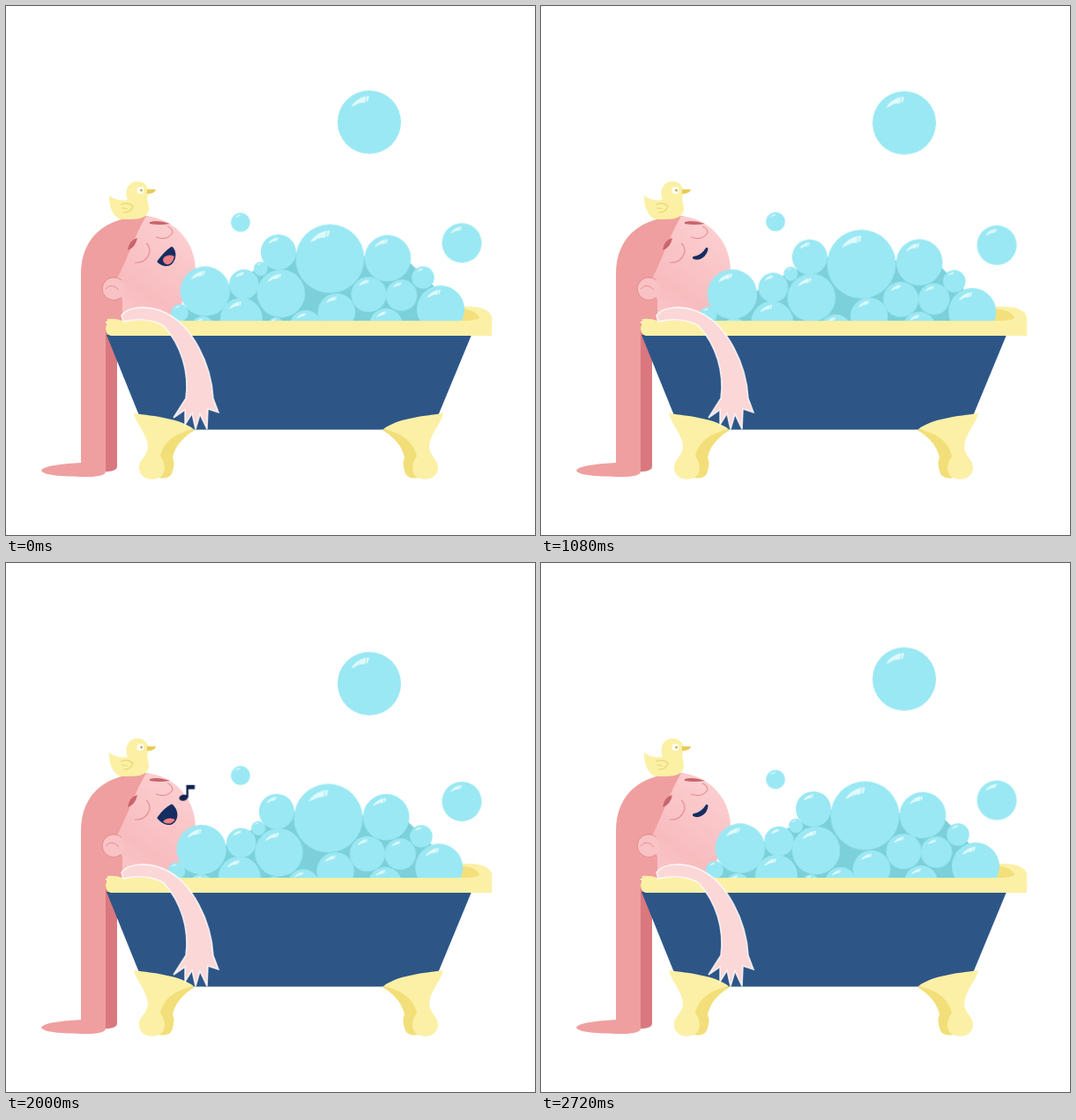
Animation, 600 px wide and 600 px high, one loop 2.76 s. Source, as an HTML page without scripts:

```html
<!DOCTYPE html>
<html lang="en">
<head>
<meta charset="utf-8">
<title>Bubble bath</title>
<style>
  html, body { margin: 0; width: 100%; height: 100%; overflow: hidden; background: #fff; }
  svg { display: block; width: 100vw; height: 100vh; }

  /* Foam leans left and sinks, each bubble by its own --x and --y */
  .foam > * { animation: lean 1380ms cubic-bezier(.37, 0, .63, 1) -105ms infinite alternate; }
  @keyframes lean { to { transform: translate(var(--x), var(--y)); } }

  .float { animation: bob 690ms cubic-bezier(.37, 0, .63, 1) var(--delay, -90ms) infinite alternate; }
  @keyframes bob { to { transform: translateY(var(--y)); } }

  .mouth { animation: sing 2760ms linear infinite; }
  @keyframes sing {
    0%, 100% { d: path("M173 290Q181 279 188 274.5C196 284 186 301 173 290Z"); }
    1.5%, 31.9%, 47.8%, 81.2% { d: path("M173 289Q180 279 188 275C200 286 188 306 173 289Z"); }
    34.8%, 44.9%, 84.8%, 98.5% { d: path("M173.5 285.5Q183 284 188 275.5C186.500 283 180 288 173.5 285.5Z"); }
  }
  .tongue { animation: tongue 2760ms linear infinite; transform-origin: 186px 295px; }
  @keyframes tongue {
    0%, 100% { transform: translateY(-7px); }
    1.5%, 31.9%, 47.8%, 81.2% { transform: none; }
    34.8%, 44.9%, 84.8%, 98.5% { transform: translateY(-8px) scale(0); }
  }

  .note { animation: rise 2760ms linear var(--delay) infinite; }
  @keyframes rise {
    0% { transform: translate(192px, 276px) scale(0); opacity: 1; }
    2.5% { transform: translate(205px, 261px) scale(.8); }
    6.9% { transform: translate(218px, 237px); }
    12% { transform: translate(236px, 213px) rotate(14deg) skewX(12deg) scale(1, 1.35); opacity: 1; }
    16.7%, 100% { transform: translate(248px, 190px) rotate(16deg) scale(.2); opacity: 0; }
  }
</style>
</head>
<body>
<svg viewBox="0 0 600 600">
  <defs>
    <linearGradient id="skin" x1="1" y1="0" x2=".5" y2="1">
      <stop offset="0" stop-color="#fdd3d4"/>
      <stop offset=".8" stop-color="#f8bcbf"/>
      <stop offset="1" stop-color="#f9c3c5"/>
    </linearGradient>
    <g id="bubble">
      <circle r="100" fill="#9ae8f3"/>
      <path d="M-58-48Q-43-74-10-82L-13-62Q-34-62-44-53ZM-8-82L0-82-4-66-10-63Z" fill="#e0fafc"/>
    </g>
    <g id="note" fill="#11234f">
      <ellipse cx="-5" cy="7" rx="6" ry="4.3" transform="rotate(-12 -5 7)"/>
      <path d="M-1-11H11V-5H2V7H-1Z"/>
    </g>
    <g id="foot">
      <path d="M215 480.500C203 487 192 498 189 512Q192 519 189 527C188 534 181 537 174 535L166 510 187 480Z" fill="#f2df79"/>
      <path d="M145 462C168 465 198 468 213 480C193 484 178 494 175 511C181 517 182 531 174 535C162 540 150 534 151 522C152 513 164 508 160 494C157 482 148 474 145 462Z" fill="#fcf0a6"/>
    </g>
    <clipPath id="inMouth"><path class="mouth" d="M173 289Q180 279 188 275C200 286 188 306 173 289Z"/></clipPath>
  </defs>

  <rect width="600" height="600" fill="#fff"/>

  <!-- Hair and head -->
  <path d="M108 360H126V522Q126 528 112 528Z" fill="#d9787f"/>
  <path d="M85 304C85 263 112 238 162 238L150 358H113V528Q113 533 96 534C68 534 43 533 40 527C42 521 68 519 85 518Z" fill="#ef9f9f"/>
  <path d="M159 238C194 242 215 270 215 300C213 318 199 330 198 345V366H132V334L126 309C137 289 145 262 159 238Z" fill="url(#skin)"/>
  <circle cx="122" cy="321" r="12.5" fill="#f9c3c5"/>
  <path d="M131 311A13 13 0 1 0 130 331M113 321Q120 313 128 322" fill="none" stroke="#e68f94"/>

  <!-- Face -->
  <path d="M170 262Q183 267 189 257Q188 251 183 250M146 291Q159 292 163 279Q163 272 159 269" fill="none" stroke="#e58f93" stroke-width="1.1"/>
  <path d="M163 245Q172 242 186 247Q174 249 163 247ZM149 263Q140 265 138 277Q147 274 149 263Z" fill="#c8656c"/>
  <path class="mouth" d="M173 289Q180 279 188 275C200 286 188 306 173 289Z" fill="#152d61" stroke="#152d61" stroke-width="3" stroke-linejoin="round"/>
  <g clip-path="url(#inMouth)">
    <ellipse class="tongue" cx="186" cy="295" rx="8" ry="5.5" fill="#ee8186"/>
  </g>

  <!-- Duck -->
  <path d="M117 215Q126 222 138 220C134 209 139 199 149 199C158 199 163 206 161 214C159 220 162 224 162 231C161 239 153 242 141 242H130C120 238 117 227 117 215Z" fill="#fbf0a3"/>
  <path d="M160 208L170 208Q169 213 160 213Z" fill="#e9ca57"/>
  <path d="M130 225Q139 222 144 227Q141 235 133 234M131 229L138 230" fill="none" stroke="#ead77c" stroke-width="1.2"/>
  <circle cx="152.5" cy="209" r="4" fill="#fff"/>
  <circle cx="153.5" cy="209" r="1.5" fill="#c4ae62"/>

  <!-- Floating bubbles -->
  <g class="float" style="--y:5.3px"><use href="#bubble" transform="translate(412 131.5) scale(.36)"/></g>
  <g class="float" style="--y:-4.5px"><use href="#bubble" transform="translate(266 245.5) scale(.108)"/></g>
  <g class="float" style="--y:3.8px;--delay:-1170ms"><use href="#bubble" transform="translate(517 268) scale(.225)"/></g>

  <!-- Far lip of the tub, then the foam -->
  <path d="M470 341H525Q546 341 551 352V374H470Z" fill="#fbf0a6"/>
  <path d="M490 344H521Q536 346 538 357H490Z" fill="#f3e07c"/>
  <g class="foam">
    <path style="--x:-5px;--y:5px" d="M195 370V347L250 318 285 298 330 280 410 284 458 291 482 314 505 340V370Z" fill="#7bd0d9"/>
    <g style="--x:-6px;--y:6px"><use href="#bubble" transform="translate(289 298) scale(.08)"/></g>
    <g style="--x:-4.5px;--y:6px"><use href="#bubble" transform="translate(309 279) scale(.2)"/></g>
    <g style="--x:-7px;--y:4px"><use href="#bubble" transform="translate(270 315.5) scale(.168)"/></g>
    <g style="--x:-8px;--y:3px"><use href="#bubble" transform="translate(197 348) scale(.1)"/></g>
    <g style="--x:-9.5px;--y:3.5px"><use href="#bubble" transform="translate(226 323.5) scale(.282)"/></g>
    <g style="--x:-4px;--y:2px"><use href="#bubble" transform="translate(223 366) scale(.14)"/></g>
    <g style="--x:-5px;--y:4px"><use href="#bubble" transform="translate(267 355) scale(.24)"/></g>
    <g style="--x:-5px;--y:5px"><use href="#bubble" transform="translate(306 362) scale(.09)"/></g>
    <g style="--x:-5.5px;--y:5px"><use href="#bubble" transform="translate(312 326) scale(.272)"/></g>
    <g style="--x:-6px;--y:5px"><use href="#bubble" transform="translate(340 363) scale(.18)"/></g>
    <g style="--x:-3px;--y:5px"><use href="#bubble" transform="translate(375 347) scale(.212)"/></g>
    <g style="--x:-4.3px;--y:6.5px"><use href="#bubble" transform="translate(367.5 286.5) scale(.39)"/></g>
    <g style="--x:-4px;--y:5px"><use href="#bubble" transform="translate(433 286) scale(.263)"/></g>
    <g style="--x:-4.5px;--y:4.5px"><use href="#bubble" transform="translate(473 308) scale(.128)"/></g>
    <g style="--x:-3.5px;--y:6px"><use href="#bubble" transform="translate(411.5 327) scale(.2)"/></g>
    <g style="--x:-3px;--y:4.5px"><use href="#bubble" transform="translate(448.5 328) scale(.178)"/></g>
    <g style="--x:-2px;--y:4px"><use href="#bubble" transform="translate(431 362) scale(.19)"/></g>
    <g style="--x:-4px;--y:3px"><use href="#bubble" transform="translate(493 344) scale(.27)"/></g>
  </g>

  <!-- Tub -->
  <path d="M114 373H528L483.5 480.500H157.5Z" fill="#2d5687"/>
  <path d="M115 355Q124 354 132 357H522Q541 356 548 347Q552 352 551 364Q549 374 539 374H119Q113 373 113 365Z" fill="#fbf0a6"/>
  <use href="#foot"/>
  <use href="#foot" transform="translate(641) scale(-1 1)"/>

  <!-- Arm -->
  <path d="M131 351C139 340 162 339 181 348C211 362 233 406 235 445L241 461 229 457 228 480 220 463 215 480 211 462 203 475 203 458 190 467 204 445C208 416 199 385 179 363C165 354 146 355 133 358Z" fill="#fcd7d7" stroke="#fff" stroke-width="1.6" stroke-opacity=".8"/>

  <use class="note" href="#note" style="--delay:-2610ms"/>
  <use class="note" href="#note" style="--delay:-1510ms"/>
  <use class="note" href="#note" style="--delay:-830ms"/>
</svg>
</body>
</html>
```
